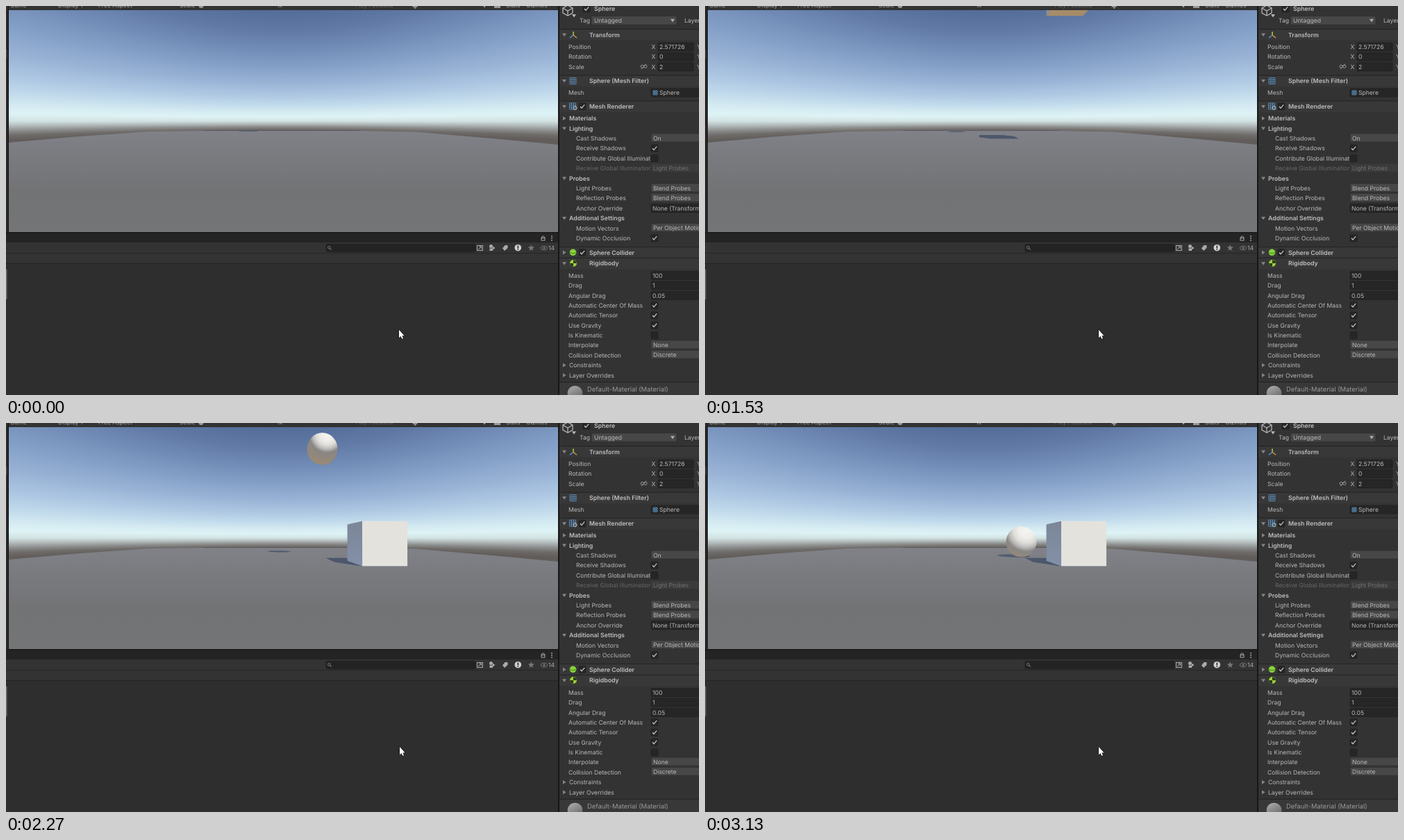
An HTML page with a canvas for the animation above (3.19 s loop, 998 by 561 pixels).

```html
<!DOCTYPE html>
<html lang="en">
<head>
<meta charset="utf-8">
<title>Falling bodies</title>
<style>
html, body { margin: 0; width: 100%; height: 100%; overflow: hidden; background: #2e2e2e; }
canvas { display: block; position: absolute; left: 0; top: 0; }
</style>
</head>
<body>
<canvas id="stage" width="998" height="561"></canvas>
<script>
const W = 998, H = 561, LOOP = 3190;
const VIEW = { x: 4, y: 6, w: 791, h: 320 };
const MID = 400, HORIZON = 166, FOCUS = 277, EYE = 1.246;
const PANEL = '#333', FIELD = '#262626', TEXT = '#b9b9b9';
const stage = document.getElementById('stage').getContext('2d');
const back = document.createElement('canvas');
back.width = W;
back.height = H;
let c = back.getContext('2d');

function rect(x, y, w, h, fill) {
  c.fillStyle = fill;
  c.fillRect(x, y, w, h);
}

function box(x, y, w, h, fill, line) {
  c.beginPath();
  c.roundRect(x, y, w, h, 1.5);
  c.fillStyle = fill;
  c.fill();
  if (line) {
    c.strokeStyle = line;
    c.lineWidth = 0.6;
    c.stroke();
  }
}

function trace(points) {
  c.beginPath();
  points.forEach(([x, y]) => c.lineTo(x, y));
  c.closePath();
}

function poly(points, fill) {
  trace(points);
  c.fillStyle = fill;
  c.fill();
}

function stroke(points, color, width = 1) {
  c.beginPath();
  points.forEach(([x, y]) => c.lineTo(x, y));
  c.strokeStyle = color;
  c.lineWidth = width;
  c.stroke();
}

function disc(x, y, r, fill) {
  c.beginPath();
  c.arc(x, y, r, 0, 7);
  c.fillStyle = fill;
  c.fill();
}

function text(str, x, y, color = TEXT, weight = 400, size = 8.6) {
  c.font = `${weight} ${size}px Inter, sans-serif`;
  c.textRendering = 'geometricPrecision';
  c.fillStyle = color;
  c.fillText(str, x, y + 3.1);
}

const bold = (str, x, y) => text(str, x, y, '#bfbfbf', 600, 8.75);

function addStops(g, stops) {
  stops.forEach(([at, color]) => g.addColorStop(at, color));
  return g;
}

const blend = (x0, y0, x1, y1, stops) => addStops(c.createLinearGradient(x0, y0, x1, y1), stops);

// ---- Sky and ground ----

const GROUND = [[4, 197], [100, 188.5], [205, 181], [300, 179.7], [500, 179.7],
  [590, 181.5], [700, 191], [795, 200], [795, 326], [4, 326]];

// Heights above the horizon at the middle of the view.
const SKY = [[160, '#546d98'], [130, '#607aa5'], [100, '#738eb8'], [75, '#87a2c9'],
  [55, '#99b3d6'], [38, '#acc6e2'], [24, '#c0d9eb'], [13, '#d5ebf2'], [6, '#def3f5'],
  [0, '#d2e2e2'], [-4, '#b2baba'], [-8, '#8c8e8d'], [-12, '#6e6b69'], [-16, '#625d5b']];

function drawView() {
  for (let x = VIEW.x; x < VIEW.x + VIEW.w; x += 2) {
    const k = Math.hypot(1, (x - MID) / FOCUS);
    const stops = SKY.map(([d, color]) => [(160 - d) / 176, color]);
    rect(x, VIEW.y, 2, 200, blend(0, HORIZON - 160 * k, 0, HORIZON + 16 * k, stops));
  }
  poly(GROUND, blend(0, 180, 0, 326, [[0, '#808288'], [0.25, '#797b7f'], [0.6, '#727375'], [1, '#747577']]));
  stroke([[285, 179.6], [510, 179.6]], '#5b5a5f', 1);
}

// ---- Editor panels ----

function arrow(x, y, open, color = '#858585') {
  poly(open ? [[x - 3, y - 2], [x + 3, y - 2], [x, y + 2.5]]
            : [[x - 2, y - 3], [x + 2.5, y], [x - 2, y + 3]], color);
}

function check(x, y, on) {
  box(x - 5, y - 5, 10, 10, FIELD, '#1e1e1e');
  if (on) stroke([[x - 3, y], [x - 1, y + 2.3], [x + 3.2, y - 2.6]], '#c6c6c6', 1.3);
}

function header(name, y, { open = true, toggle } = {}) {
  rect(797, y - 8, 201, 16, '#383838');
  rect(797, y - 8.5, 201, 1, '#222');
  arrow(804, y, open);
  if (toggle) check(830, y, true);
  bold(name, 840, y);
}

const kinds = {
  field(y, value) {
    box(929, y - 6, 75, 12, FIELD, '#1e1e1e');
    text(value, 931, y);
  },
  drop(y, value) {
    box(929, y - 7, 75, 12, '#474747', '#2a2a2a');
    text(value, 932, y - 0.6);
  },
  off(y, value) {
    box(929, y - 6.5, 75, 12, '#3b3b3b');
    text(value, 932, y - 0.4, '#727272');
  },
  check(y, on) { check(934, y, on); },
  axis(y, value) {
    text('X', 929.5, y);
    box(939, y - 6, 51, 12, FIELD, '#1e1e1e');
    text(value, 941, y);
    text('Y', 995, y);
  }
};

function row(x, y, label, kind, value) {
  text(label, x, y, kind === 'off' ? '#686868' : TEXT);
  rect(928, y - 7, 70, 14, PANEL);
  kinds[kind](y, value);
}

function fold(label, y, open, plain) {
  arrow(804, y, open);
  (plain ? text : bold)(label, 811, y);
}

function grid(x, y, r) {
  for (let i = -1; i <= 1; i += 2 / 3) {
    stroke([[x + i * r, y - r], [x + i * r, y + r]], '#5f97c9', 0.8);
    stroke([[x - r, y + i * r], [x + r, y + i * r]], '#5f97c9', 0.8);
  }
}

function drawInspector() {
  rect(796, 0, 202, H, PANEL);
  rect(795, 0, 2, H, '#171717');

  const cube = '#b4b4b4';
  stroke([[809, -1], [816, 3], [816, 10], [809, 14], [802, 10], [802, 3], [809, -1]], cube, 1.3);
  stroke([[802, 3], [809, 7], [816, 3]], cube, 1.3);
  stroke([[809, 7], [809, 14]], cube, 1.3);
  arrow(818, 14, true, cube);
  check(836, 4, true);
  bold('Sphere', 847, 4.3);
  text('Tag', 826, 21.3);
  box(843, 14.5, 123, 12.5, '#474747', '#2a2a2a');
  text('Untagged', 847, 20.7);
  arrow(960, 20.8, true, '#b0b0b0');
  text('Layer', 977, 21.3);

  header('Transform', 41.5);
  stroke([[817, 37], [817, 42]], '#a8d436', 1.5);
  stroke([[817, 42], [812, 46]], '#4d9be0', 1.5);
  stroke([[817, 42], [822, 46]], '#e0903e', 1.5);
  row(810, 59, 'Position', 'axis', '2.571726');
  row(810, 73.3, 'Rotation', 'axis', '0');
  row(810, 87.7, 'Scale', 'axis', '2');
  c.strokeStyle = '#999';
  c.lineWidth = 1;
  for (const x of [914, 918.5]) {
    c.beginPath();
    c.roundRect(x, 85.2, 4.5, 4, 2);
    c.stroke();
  }
  stroke([[915, 91], [922, 83.5]], '#999');

  header('Sphere (Mesh Filter)', 108);
  grid(816.5, 108, 4.5);
  row(810, 125, 'Mesh', 'field', '');
  grid(935, 125, 3);
  text('Sphere', 941, 125);

  header('Mesh Renderer', 145, { toggle: true });
  grid(816, 144.5, 4.5);
  c.beginPath();
  c.arc(819.5, 147, 2.5, 0, 7);
  c.strokeStyle = '#ddd';
  c.stroke();
  fold('Materials', 162, false);
  fold('Lighting', 176.5, true);
  row(821, 191, 'Cast Shadows', 'drop', 'On');
  row(821, 205.3, 'Receive Shadows', 'check', true);
  row(821, 219.7, 'Contribute Global Illumination', 'check', false);
  row(821, 234, 'Receive Global Illumination', 'off', 'Light Probes');
  fold('Probes', 248.5, true);
  row(821, 263, 'Light Probes', 'drop', 'Blend Probes');
  row(821, 277.3, 'Reflection Probes', 'drop', 'Blend Probes');
  row(821, 291.7, 'Anchor Override', 'field', 'None (Transform)');
  fold('Additional Settings', 306, true);
  row(821, 320.4, 'Motion Vectors', 'drop', 'Per Object Motion');
  row(821, 334.8, 'Dynamic Occlusion', 'check', true);

  header('Sphere Collider', 355.5, { open: false, toggle: true });
  disc(816.5, 355.3, 4.8, '#86d338');
  stroke([[812, 355.6], [816.5, 357], [821, 355.6]], '#3c6b1c', 0.8);

  header('Rigidbody', 371.3);
  disc(817, 371, 5, '#9bd03c');
  poly([[817, 371], [817, 366], [821, 368], [822, 371]], '#2c3a1a');
  poly([[817, 371], [817, 376], [813, 374.5], [812, 371]], '#2c3a1a');
  row(810, 388.7, 'Mass', 'field', '100');
  row(810, 403.1, 'Drag', 'field', '1');
  row(810, 417.5, 'Angular Drag', 'field', '0.05');
  row(810, 431.8, 'Automatic Center Of Mass', 'check', true);
  row(810, 446.2, 'Automatic Tensor', 'check', true);
  row(810, 460.5, 'Use Gravity', 'check', true);
  row(810, 474.9, 'Is Kinematic', 'check', false);
  row(810, 489.2, 'Interpolate', 'drop', 'None');
  row(810, 503.6, 'Collision Detection', 'drop', 'Discrete');
  fold('Constraints', 518, false, true);
  fold('Layer Overrides', 532.4, false, true);

  rect(797, 542.5, 201, 19, '#383838');
  rect(797, 542, 201, 1, '#222');
  disc(819.5, 558.5, 10.8, blend(814, 548, 824, 566, [[0, '#a8a8a8'], [1, '#6c6c6c']]));
  text('Default-Material (Material)', 837, 553, '#9a9a9a', 400, 9.4);
}

function drawToolbar() {
  rect(0, 0, 796, 6, PANEL);
  const items = [['Game', 6], ['Display 1', 75], ['Free Aspect', 133], ['Scale', 250],
    ['1x', 390], ['Stats', 720], ['Gizmos', 749]];
  items.forEach(([name, x]) => text(name, x, -0.7, '#a8a8a8'));
  text('Play Focused', 503, -0.7, '#686868');
  disc(281, -0.5, 3.5, '#9a9a9a');
  poly([[585, 1.5], [589, -3], [593, 1.5]], '#aaa');
  rect(588, 2, 2.5, 1.5, '#aaa');
  arrow(689, 0, true, '#aaa');
  rect(703, 0, 9, 3, '#999');
  rect(0, 6, 3, 320, '#2c2c2c');
  rect(2.5, 0, 1.5, 327, '#171717');
  rect(0, 63, 1.5, 12, '#444');
}

function drawProject() {
  rect(0, 326, 796, 15, '#242424');
  rect(0, 326, 796, 1.5, '#191919');
  rect(0, 341, 796, 30, PANEL);
  rect(0, 356, 796, 1, '#252525');
  rect(0, 371, 796, 1, '#222');
  rect(0, 372, 796, 189, '#2e2e2e');
  rect(0, 380, 1.5, 43, '#6a6a6a');

  const icon = '#aaa';
  c.strokeStyle = icon;
  c.lineWidth = 1;
  c.strokeRect(771, 334.5, 5, 3.5);
  c.beginPath();
  c.arc(773.5, 334, 2, Math.PI, 0);
  c.stroke();
  for (const dy of [-3, 0, 3]) disc(786, 335 + dy, 0.9, icon);

  box(461, 343.5, 215, 11, '#232323', '#1b1b1b');
  c.beginPath();
  c.arc(465.3, 348.2, 1.8, 0, 7);
  c.strokeStyle = icon;
  c.stroke();
  stroke([[466.6, 349.5], [468.7, 351.5]], icon);

  c.strokeStyle = icon;
  c.strokeRect(678.5, 345.5, 8, 7);
  stroke([[680, 351], [684.5, 347]], icon);
  stroke([[681.5, 347], [684.5, 347], [684.5, 350]], icon);
  disc(698.5, 346.5, 2.5, icon);
  rect(696.5, 349.5, 4.5, 3.5, icon);
  poly([[701, 346.5], [704.5, 349], [701, 351.5]], icon);
  poly([[715, 349.5], [718.5, 345], [722.5, 345], [722.5, 349], [718, 353]], icon);
  disc(737.3, 348.7, 4.8, '#d2d2d2');
  rect(736.5, 345.5, 1.7, 4, '#2c2c2c');
  rect(736.5, 350.4, 1.7, 1.5, '#2c2c2c');
  poly([...Array(10).keys()].map(i => {
    const r = i % 2 ? 2.1 : 4.8, a = i * Math.PI / 5;
    return [756.3 + r * Math.sin(a), 349 - r * Math.cos(a)];
  }), '#777');
  c.beginPath();
  c.ellipse(775, 349, 4.5, 2.8, 0, 0, 7);
  c.strokeStyle = '#777';
  c.stroke();
  disc(775, 349, 1.6, '#777');
  text('14', 781, 349, '#aaa');
}

// ---- Falling bodies, in metres and seconds ----

const G = 9.81, DROP = 21.07, LEAD = 0.16;
const SUN = { x: 0.321, y: 0.766, z: 0.557 };   // towards the light, z to the viewer
const BALL = { x: 2.5717, z: 12.83 };
const CUBE = { x: 3.477, z: 8.52, size: 2 };

const project = (x, y, z) => [MID + FOCUS * x / z, HORIZON + FOCUS * (EYE - y) / z];
const castShadow = (x, y, z) => project(x - y * SUN.x / SUN.y, 0, z + y * SUN.z / SUN.y);

// The cube falls freely, the ball with a drag of 1.
const cubeHeight = t => Math.max(0, DROP - G * t * t / 2);
const ballHeight = t => Math.max(0, DROP - G * (t - 1 + Math.exp(-t)));

function cubeCorners(y, place) {
  const { x, z, size } = CUBE;
  return [[x, z], [x + size, z], [x + size, z + size], [x, z + size]].map(([u, w]) => place(u, y, w));
}

function cubeShadow(y) {
  const color = '#4d576b';
  const low = cubeCorners(y, castShadow), high = cubeCorners(y + CUBE.size, castShadow);
  poly(low, color);
  poly(high, color);
  low.forEach((p, i) => {
    const j = (i + 1) % 4;
    poly([p, low[j], high[j], high[i]], color);
  });
}

function ballShadow(y) {
  const points = [];
  for (let a = 0; a < 6.28; a += 0.1) {
    const along = Math.cos(a) / SUN.y, across = Math.sin(a);
    const dx = 0.866 * across - 0.5 * along, dz = 0.5 * across + 0.866 * along;
    const h = y + 1;
    points.push(project(BALL.x - h * SUN.x / SUN.y + dx, 0, BALL.z + h * SUN.z / SUN.y + dz));
  }
  poly(points, '#565e70');
}

function drawCube(y) {
  const low = cubeCorners(y, project), high = cubeCorners(y + CUBE.size, project);
  if (y > EYE) poly(low, '#a68c69');
  const [left, bottom] = low[0], top = high[0][1];
  poly([low[0], low[3], high[3], high[0]], blend(0, top, 0, bottom, [[0, '#7c8698'], [1, '#8290a8']]));
  rect(left, top, low[1][0] - left, bottom - top, '#e3e2dd');
}

function drawBall(height) {
  const [x, y] = project(BALL.x, height + 1, BALL.z);
  if (y < -30) return;
  const r = 22, tilt = Math.atan((HORIZON - y) / FOCUS);
  const up = SUN.y * Math.cos(tilt) + SUN.z * Math.sin(tilt);
  const facing = SUN.z * Math.cos(tilt) - SUN.y * Math.sin(tilt);
  const cx = x + SUN.x * r, cy = y - up * r;
  const edge = (Math.hypot(SUN.x, up) + facing) / 2;   // where direct light ends
  const shade = addStops(c.createRadialGradient(cx, cy, 0, cx, cy, 2 * r), [
    [0, '#f6f4f0'], [0.35 * edge, '#f0eeea'], [0.6 * edge, '#dfddd9'], [0.8 * edge, '#bebcba'],
    [0.93 * edge, '#9c9a98'], [edge, '#888684'], [1, '#9a8a75']]);
  c.beginPath();
  c.ellipse(x, y, r, r * (1 + 0.3 * Math.sin(tilt) ** 2), 0, 0, 7);
  c.fillStyle = shade;
  c.fill();
}

function drawCursor(x, y) {
  trace([[x, y], [x, y + 11.6], [x + 2.5, y + 9.3], [x + 4.2, y + 13], [x + 6, y + 12.2],
    [x + 4.4, y + 8.6], [x + 7.6, y + 8.4]]);
  c.lineJoin = 'round';
  c.strokeStyle = '#111';
  c.lineWidth = 1.2;
  c.stroke();
  c.fillStyle = '#fff';
  c.fill();
}

const stepStart = k => Math.round(k * 20 / 3) * 10;
function stepAt(ms) {
  const k = Math.floor((ms + 5) * 15 / 1000);
  return Math.min(47, stepStart(k) > ms ? k - 1 : k);
}

function draw(step) {
  const t = step / 15 + LEAD;
  const cube = cubeHeight(t), ball = ballHeight(t);
  c.drawImage(back, 0, 0);
  c.save();
  c.beginPath();
  c.rect(VIEW.x, VIEW.y, VIEW.w, VIEW.h);
  c.clip();
  c.save();
  trace(GROUND);
  c.clip();
  ballShadow(ball);
  cubeShadow(cube);
  c.restore();
  drawBall(ball);
  drawCube(cube);
  c.restore();
  drawCursor(step ? 567 : 566, 467);
}

rect(0, 0, W, H, '#2e2e2e');
drawView();
drawToolbar();
drawProject();
drawInspector();
c = stage;

const start = performance.now();
let shown = -1;
function tick() {
  const step = stepAt((performance.now() - start) % LOOP);
  if (step !== shown) draw(shown = step);
  requestAnimationFrame(tick);
}
tick();
</script>
</body>
</html>
```
